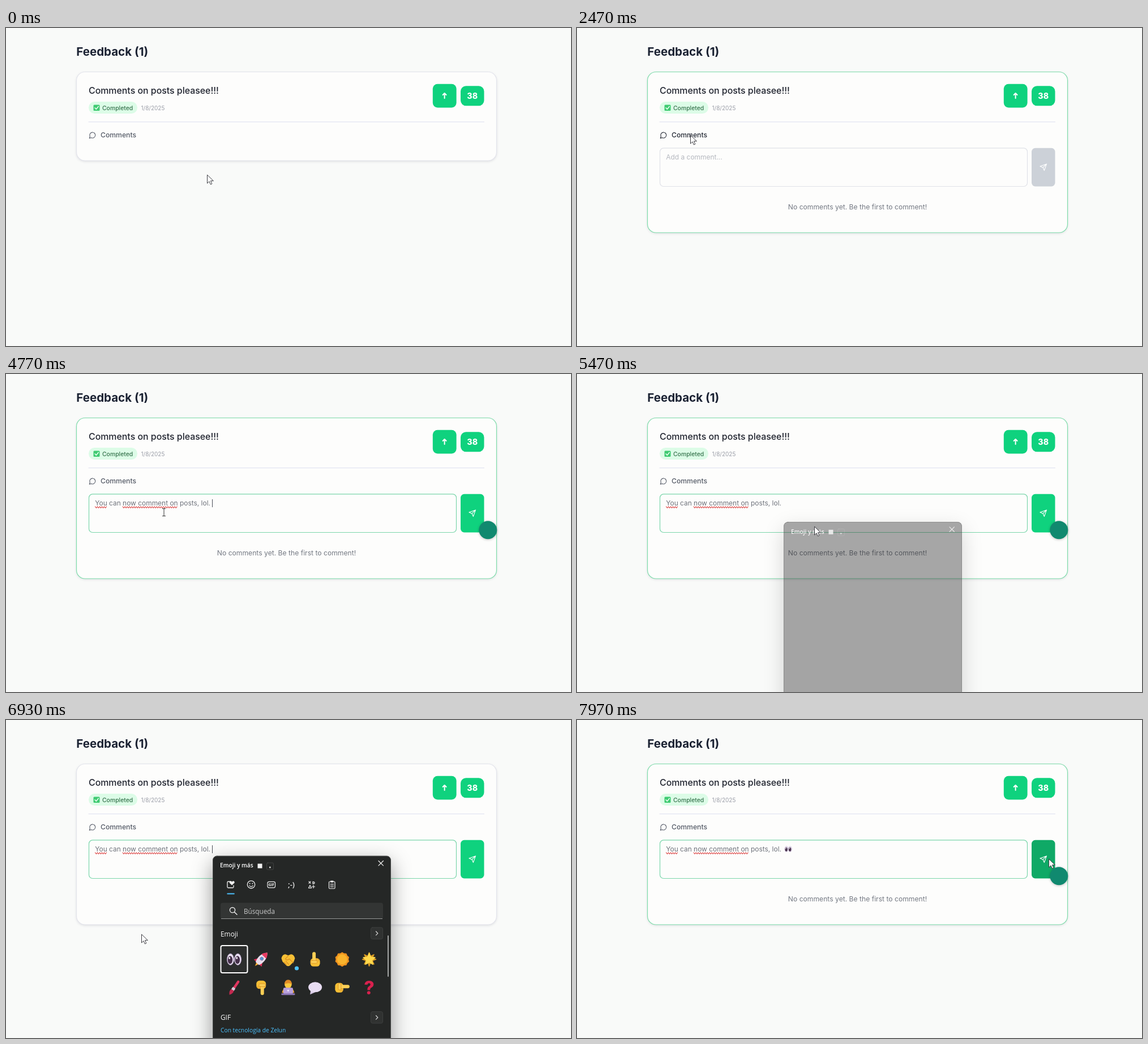
Recreate the animation shown at these times as an HTML page with a canvas. Size 998 px wide and 561 px high, loop 8000 ms.

```html
<!DOCTYPE html>
<html lang="en">
<head>
<meta charset="utf-8">
<title>Feedback</title>
<style>
html, body { margin: 0; width: 100%; height: 100%; overflow: hidden; background: #f9faf9; }
canvas { display: block; }
</style>
</head>
<body>
<canvas id="stage" width="998" height="561"></canvas>
<script>
const c = document.getElementById('stage').getContext('2d');
const LOOP = 8000;
const UI = 'Inter, sans-serif', PANEL = '"Open Sans", sans-serif';
const COMMENT = 'You can now comment on posts, lol.';
const CYAN = '#4cc2ff', GREEN = '#0fd27e', YELLOW = '#f6bf35', DARK = '#252726';

// Moments of the story, in ms
const T = { enter: 480, open: 2000, focus: 2800, type: 2930, typed: 3650, check: 3760,
  space: 4500, panel: 5370, search: 5600, blur: 6800, emoji: 7200, close: 7380,
  reenter: 7540, send: 7760 };

const PATH = [[0, 355, 259], [350, 355, 259], [800, 325, 208], [1300, 228, 192], [1750, 200, 189],
  [2500, 200, 189], [2790, 279, 244], [4950, 279, 244], [5400, 419, 269], [5560, 419, 269],
  [6000, 447, 373], [6300, 447, 373], [6750, 239, 378], [6940, 239, 378], [7160, 403, 424],
  [7320, 403, 424], [7840, 833, 245], [8000, 833, 245]];

const clamp = v => Math.max(0, Math.min(1, v));
const ramp = (t, start, len) => clamp((t - start) / len);
const smooth = p => p * p * (3 - 2 * p);
const within = (t, a, b) => t >= a && t < b;

function mix(a, b, p) {
  const part = (h, i) => parseInt(h.slice(i, i + 2), 16);
  return `rgb(${[1, 3, 5].map(i => Math.round(part(a, i) + (part(b, i) - part(a, i)) * p))})`;
}

function cursorAt(t) {
  const i = Math.max(1, PATH.findIndex(k => k[0] > t));
  const [t0, x0, y0] = PATH[i - 1], [t1, x1, y1] = PATH[i];
  const p = smooth(ramp(t, t0, t1 - t0));
  return [x0 + (x1 - x0) * p, y0 + (y1 - y0) * p];
}

function box(x, y, w, h, r, fill, stroke, line = 1) {
  c.beginPath();
  c.roundRect(x, y, w, h, r);
  paint(fill, stroke, line);
}

function paint(fill, stroke, line = 1) {
  if (fill) { c.fillStyle = fill; c.fill(); }
  if (stroke) { c.strokeStyle = stroke; c.lineWidth = line; c.stroke(); }
}

function oval(x, y, rx, ry, fill, stroke, line) {
  c.beginPath();
  c.ellipse(x, y, rx, ry, 0, 0, 7);
  paint(fill, stroke, line);
}

function shape(d, fill, stroke, line) {
  const p = new Path2D(d);
  if (fill) { c.fillStyle = fill; c.fill(p); }
  if (stroke) { c.strokeStyle = stroke; c.lineWidth = line; c.stroke(p); }
}

function text(s, x, y, size, color, weight = 400, family = UI, align = 'left') {
  c.font = `${weight} ${size}px ${family}`;
  c.fillStyle = color;
  c.textAlign = align;
  c.fillText(s, x, y);
}

function at(x, y, draw, scale = 1, turn = 0) {
  c.save();
  c.translate(x, y);
  c.rotate(turn);
  c.scale(scale, scale);
  draw();
  c.restore();
}

function shadow(color, blur, dy) {
  c.shadowColor = color;
  c.shadowBlur = blur;
  c.shadowOffsetY = dy;
}

function drawCard(t, open) {
  const hover = t < 5000 ? ramp(t, T.enter, 200)
    : t < 7000 ? 1 - ramp(t, T.search, 200) : ramp(t, T.reenter, 200);
  c.save();
  shadow('rgba(60,60,90,.16)', 4, 1.5);
  box(124.5, 77.5, 742, open ? 283.5 : 156.5, 15, '#fdfdfc');
  c.restore();
  box(124.5, 77.5, 742, open ? 283.5 : 156.5, 15, null, mix('#e3e4ec', '#7ddcaa', hover), 1.2);

  text('Comments on posts pleasee!!!', 146, 116.3, 15.9, '#20242f', 500);
  box(146, 130, 86, 21, 10.5, '#dcfce7');
  box(154.5, 135.5, 11, 10.5, 1.5, '#3fcb72');
  shape('M157 140.8l2.3 2.4 4-5', null, '#f2fff5', 1.4);
  text('Completed', 170, 144.6, 10.4, '#36734d', 500);
  text('1/8/2025', 238.5, 144.5, 10, '#9b9ea8');

  box(753.8, 98.8, 41.8, 41.8, 8.5, GREEN);
  shape('M774.6 124V115.2M771.6 118l3-3 3 3', null, '#fff', 2);
  box(803, 102.3, 41.5, 35, 9.5, GREEN);
  text('38', 823.7, 124.8, 14.2, '#fff', 800, UI, 'center');

  shape('M146 165.7H844.5', null, '#e3e4f1', 1.2);
  const over = within(t, 1650, 2580) ? '#252a35' : '#555b67';
  at(146.2, 182.4, () => shape('M7.9 20A9 9 0 1 0 4 16.1L2 22Z', null, over, 2), .55);
  text('Comments', 167, 192.6, 12.2, over, 500);
}

function squiggle(x, w) {
  c.beginPath();
  for (let i = 0; i <= w; i += 2) c.lineTo(x + i, 233.8 + (i / 2 % 2) * 2.6);
  paint(null, '#df5656', 1.1);
}

function eyes() {
  for (const x of [-6.5, 6.5]) {
    oval(x, 0, 6, 10, '#ebe2f2', '#b5a3c6', 1);
    oval(x - .6, 1, 4.2, 7, '#45304a');
    oval(x - 1.8, -2.4, 1.3, 1.9, '#fff');
  }
}

function drawForm(t) {
  const focus = ramp(t, T.focus, 150);
  box(146.5, 211.8, 649, 67.7, 6.5, '#fdfdfc', mix('#e0e2e8', '#7bd6ab', focus), 1.2);

  const count = Math.floor(COMMENT.length * ramp(t, T.type, T.typed - T.type));
  const typed = COMMENT.slice(0, count) + (t >= T.space ? ' ' : '');
  if (count) text(typed, 157.3, 232, 11.95, '#70747d');
  else text('Add a comment...', 157.3, 232, 11.95, '#b5b8bf');

  c.font = `400 11.95px ${UI}`;
  const width = s => c.measureText(s).width;
  let end = 157.3 + width(typed);
  if (t >= T.check) {
    squiggle(157.5, width('You'));
    squiggle(157.3 + width('You can '), width('now comment on'));
  }
  if (t >= T.emoji) {
    at(373.2, 227.7, eyes, .5);
    end = 381;
  }
  const edit = t >= T.emoji ? T.emoji : t >= T.space ? T.space : t >= T.typed ? T.typed : t;
  if (t >= T.focus && (t - edit) % 1060 < 530) {
    c.fillStyle = '#4a4e57';
    c.fillRect(Math.floor(end), 221, 1, 14);
  }

  const ready = ramp(t, T.type, 150);
  const pressed = ramp(t, T.send, 150);
  box(803, 211.8, 41.5, 67.7, 6.5, pressed ? mix(GREEN, '#0fa966', pressed) : mix('#ccd1d8', GREEN, ready));
  at(816.8, 238.8, () => shape('M22 2l-7 20-4-9-9-4ZM22 2L11 13', null, '#fff', 2), .57);
  text('No comments yet. Be the first to comment!', 495.5, 320.2, 12.15, '#747983', 400, UI, 'center');

  if (within(t, T.type + 100, T.search + 100) || t >= T.reenter) {
    c.save();
    shadow('rgba(0,0,0,.25)', 4, 1);
    oval(851.3, 275.2, 16, 16, '#10896f');
    c.restore();
  }
}

// A fist with the index finger up
function hand() {
  box(-8.5, -2, 17, 14.5, 5.5, YELLOW);
  box(-5, -13, 6, 18, 3, '#fbcf55');
  box(-8, 2, 12, 5, 2.5, '#fbcf55', '#dd9427', .9);
  shape('M2-1.5v4M5.5-1v4', null, '#dd9427', 1);
}

// A round form with n bumps or spikes
function burst(n, inner, outer, fill) {
  c.beginPath();
  for (let i = 0; i < n * 2; i++) {
    const r = i % 2 ? inner : outer, a = i * Math.PI / n - Math.PI / 2;
    c.lineTo(r * Math.cos(a), r * Math.sin(a));
  }
  c.closePath();
  paint(fill, fill, 1.5);
}

function rocket() {
  shape('M-3 8L0 16 3 8Z', '#ffae32');
  shape('M-4 0L-9.5 9-3 9ZM4 0L9.5 9 3 9Z', '#dd3158');
  shape('M0-16C8-8 7 3 4 10H-4C-7 3-8-8 0-16Z', '#e9deed');
  shape('M0-16C3-13 5-10 5.6-7H-5.6C-5-10-3-13 0-16Z', '#e83b62');
  oval(0, -1.5, 2.7, 2.7, '#4b9bd8', '#8578a5', 1);
}

function handshake() {
  shape('M-12-2Q-10-9-5-9L0-7 5-9Q10-9 12-2L10 4 3 11Q0 13-3 11L-10 4Z', YELLOW);
  shape('M0-6L-5-1Q-2 3 2-1L9 6M-7 5l4 4M-4 3l5 6', null, '#d98a22', 1.2);
}

function sun() {
  burst(10, 10.5, 12, '#f0941f');
  oval(0, 0, 9, 9, '#fab42c');
}

function star() {
  burst(8, 6, 12, '#d99a24');
  burst(5, 5, 11, '#ffd84c');
}

function brush() {
  box(-2.2, -15, 4.4, 17, 2.2, '#e1355f');
  box(-2.8, 0, 5.6, 5, 1, '#d6c9d8');
  shape('M-2.8 5H2.8Q4.5 10 0 15-4.5 10-2.8 5Z', '#c2294f');
}

function worker() {
  oval(0, -6, 6.3, 7, '#f8c83e');
  shape('M-6.5-6Q-6-14 0-14 6-14 6.5-6 1-10-6.5-6Z', '#e18b27');
  shape('M-11 9Q-10 0 0 0 10 0 11 9Z', '#f0a932');
  box(-8.5, 0, 17, 11, 2, '#b8a0dc');
  box(-12, 10, 24, 3, 1, '#8d77b5');
  oval(0, 5, 1.6, 1.6, '#eee4fa');
}

function balloon() {
  shape('M-8 5L-9 12 0 8Z', '#d8c9e6');
  oval(0, -1, 12, 9, '#e8dcf2');
}

const question = () => text('?', 0, 11.5, 32, '#d9214e', 800, UI, 'center');

const EMOJI = [[eyes], [rocket, .75], [handshake], [hand], [sun], [star],
  [brush, .6], [hand, Math.PI], [worker], [balloon], [hand, Math.PI / 2], [question]];

function drawTabs() {
  const w = '#efefef';
  shape('M397 285H392.5Q391 285 391 286.5V294.5Q391 296 392.5 296H400.5Q402 296 402 294.5V292', null, w, 1.3);
  shape('M399 291.5L394.8 287.5Q394 284 397 284 398.5 284 399 285.5 400 284 401.5 284 404.5 284.5 403.4 287.5Z', w);
  oval(433, 290.3, 6.7, 6.7, null, w, 1.3);
  oval(430.6, 288.5, 1, 1, w);
  oval(435.4, 288.5, 1, 1, w);
  shape('M429.7 292.2Q433 296 436.3 292.2', null, w, 1.2);
  box(462, 285.3, 13.5, 10.5, 2.5, null, w, 1.2);
  text('GIF', 468.7, 293.2, 6.6, w, 700, PANEL, 'center');
  text(';-)', 504, 294.5, 13, w, 600, PANEL, 'center');
  shape('M535 285l3 3m0-3l-3 3M534.5 296.5l2.5-5 2.5 5ZM543 291.5v5M540.5 294h5M542 285v4q3 0 3-2t-3-1', null, w, 1.2);
  box(570.5, 285, 10.5, 12.5, 1.5, null, w, 1.2);
  box(573, 283.5, 5.5, 3, 1, w);
  shape('M573 289.5h5.5M573 292h5.5M573 294.5h5.5', null, w, 1);
  box(390.3, 305.5, 13.5, 2, 1, CYAN);
}

function moreButton(y) {
  box(644.5, y, 21, 20.5, 3, '#303231', '#3d3f3e');
  shape(`M653.5 ${y + 7}l3.3 3.3-3.3 3.3`, null, '#ddd', 1.2);
}

function drawBody(t) {
  drawTabs();
  const active = within(t, T.search, T.blur);
  box(379, 322.5, 287, 28.5, 4, '#333534');
  c.fillStyle = active ? CYAN : '#969897';
  c.fillRect(380, active ? 349 : 350, 285, active ? 2 : 1);
  oval(400, 335.3, 4.6, 4.6, null, '#eee', 1.4);
  shape('M403.4 338.7l4.6 4.6', null, '#eee', 1.5);
  text('Búsqueda', 420, 342, 11.7, '#c9caca', 400, PANEL);
  if (active && (t - T.search) % 1060 < 530) box(419, 328.5, 1, 17, 0, '#eee');

  text('Emoji', 379, 381.5, 11.9, '#fff', 400, PANEL);
  moreButton(366);
  box(379.5, 398, 47, 48, 3, '#2c2e2d', '#fff', 2);
  EMOJI.forEach(([draw, turn = 0], i) =>
    at(403 + 47.7 * (i % 6), i < 6 ? 422.3 : 472.3, draw, 1, turn));
  oval(513.5, 438, 3.6, 3.6, CYAN);
  box(674, 380, 2, 73, 1, '#a3a4a4');
  text('GIF', 379, 529, 11.8, '#fff', 400, PANEL);
  moreButton(514.5);
  text('Con tecnología de Zelun', 379, 550.5, 10.25, CYAN, 400, PANEL);
}

function drawPanel(t) {
  if (!within(t, T.panel, T.close + 90)) return;
  const p = ramp(t, T.panel, 250);
  const fade = 1 - ramp(t, T.close, 90);
  c.save();
  c.translate(0, 60 * (1 - p) ** 2);
  c.globalAlpha = p * fade;
  c.save();
  // The shadow falls only outside the panel
  c.beginPath();
  c.rect(0, 0, 998, 700);
  c.roundRect(365.5, 240, 314, 400, 7);
  c.clip('evenodd');
  shadow('rgba(0,0,0,.42)', 36, 12);
  box(365.5, 240, 314, 400, 7, DARK);
  c.restore();
  box(365.5, 240, 314, 400, 7, DARK, '#4a4c4b');

  c.globalAlpha = clamp(p * 2.2) * fade;
  text('Emoji y más', 378, 260.3, 10.2, '#fff', 600, PANEL);
  box(444.5, 253.5, 8, 8, 0, '#f2f2f2');
  box(460.5, 252, 12, 12, 2, null, 'rgba(255,255,255,.12)');
  oval(466.3, 260, 1.4, 1.4, '#ddd');
  shape('M658 248.5l8.4 8.4m0-8.4l-8.4 8.4', null, '#f2f2f2', 1.2);

  c.globalAlpha = ramp(t, T.panel + 150, 150) * fade;
  if (c.globalAlpha) drawBody(t);
  c.restore();
}

function drawCursor(t) {
  const [x, y] = cursorAt(t);
  const inField = within(x, 147, 796) && within(y, 212, 279);
  if (inField && within(t, T.open, T.panel)) {
    at(x, y, () => shape('M-2.5-6.5H2.5M0-6.5V6.5M-2.5 6.5H2.5', null, '#333', 1));
  } else {
    at(x, y, () => shape('M.5.5V15L4 11.7 6.4 17 8.8 15.9 6.5 10.7H11Z', '#fff', '#3c3c42', 1));
  }
}

function frame() {
  const t = performance.now() % LOOP;
  const open = t >= T.open;
  c.fillStyle = '#f9faf9';
  c.fillRect(0, 0, 998, 561);
  c.lineCap = c.lineJoin = 'round';
  text('Feedback (1)', 124.3, 49, 20.5, '#1b2233', 700);
  drawCard(t, open);
  if (open) drawForm(t);
  drawPanel(t);
  drawCursor(t);
  requestAnimationFrame(frame);
}
frame();
</script>
</body>
</html>
```
